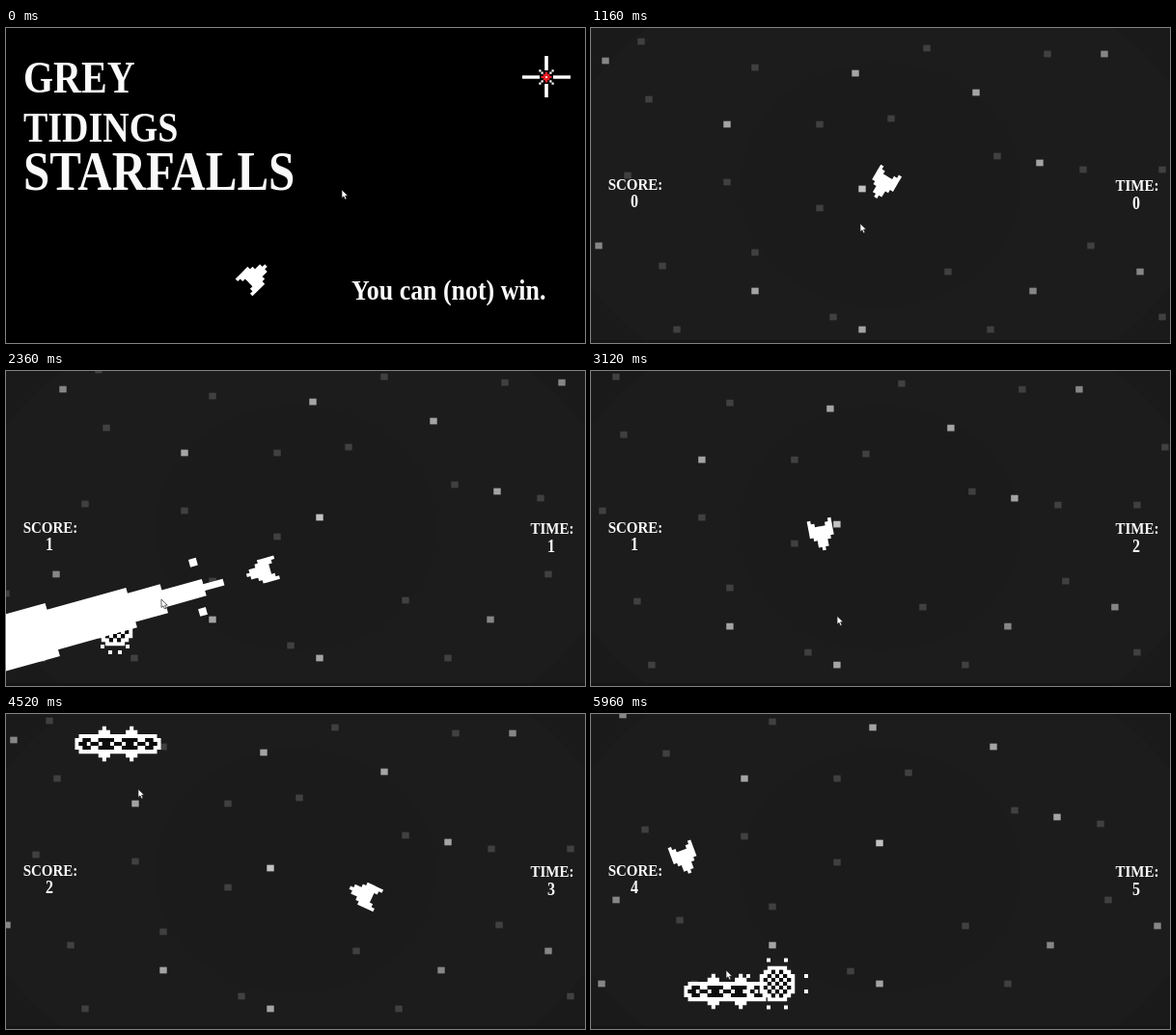
An HTML page that plays this animation: 600x327 px, repeating every 6 s.

```html
<!DOCTYPE html>
<html lang="en">
<head>
<meta charset="utf-8">
<title>Space shooter</title>
<style>
  html, body { margin: 0; width: 100%; height: 100%; overflow: hidden; background: #000; }
  svg { display: block; width: 100vw; height: 100vh; }
  text { font-family: "Liberation Serif", "Times New Roman", serif; font-weight: bold; fill: #fafafa; }
</style>
</head>
<body>
<svg id="stage" viewBox="0 0 600 327" preserveAspectRatio="none"></svg>
<script>
const LOOP = 6000, STEP = 40, START = 720;
const NS = "http://www.w3.org/2000/svg";
const stage = document.getElementById("stage");

function add(parent, tag, attrs = {}) {
  const el = document.createElementNS(NS, tag);
  for (const key in attrs) el.setAttribute(key, attrs[key]);
  parent.appendChild(el);
  return el;
}
const group = parent => add(parent, "g");
const rect = (parent, x, y, width, height, fill = "#fff") =>
  add(parent, "rect", { x, y, width, height, fill });
const square = (parent, x, y, s) => rect(parent, x - s / 2, y - s / 2, s, s);

// Letters are a little taller than the plain face.
function label(parent, x, y, size, text, anchor = "start") {
  const el = add(parent, "text", {
    transform: `translate(${x} ${y}) scale(1 1.15)`, "font-size": size, "text-anchor": anchor
  });
  el.textContent = text;
  return el;
}

// Pixel sprite centred on its own origin.
const COLORS = { "#": "#fff", r: "#e81c24", k: "#0c0c0c" };
function sprite(parent, rows, cell) {
  const g = group(parent);
  const left = -rows[0].length / 2, top = -rows.length / 2;
  for (const ch in COLORS) {
    let d = "";
    rows.forEach((row, y) => [...row].forEach((c, x) => {
      if (c === ch) d += `M${(left + x) * cell} ${(top + y) * cell}h${cell}v${cell}h${-cell}z`;
    }));
    if (d) add(g, "path", { d, fill: COLORS[ch] });
  }
  return g;
}

const mirror = half => half + [...half].reverse().join("");
const SHIP = [
  "#####....", ".#####...", "..######.", "..#######", "..######.", ".#####...", "#####...."
];
const BUG = [
  ".......#...", "......###..", ".##########", "##kk##kkkk#", "#kk#kk#kk#k",
  "##kk##kkkk#", ".##########", "......###..", ".......#..."
].map(mirror);
const WHEEL = [
  "..#r#..", ".#k#k#.", "#kk#kk#", "r#####r", "#kk#kk#", ".#k#k#.", "..#r#.."
];
const SPARK = [
  "#.....#", ".#.r.#.", "..rrr..", ".rr#rr.", "..rrr..", ".#.r.#.", "#.....#"
];
const CHECKER = Array.from({ length: 9 }, (_, y) =>
  Array.from({ length: 9 }, (_, x) => {
    const r = Math.hypot(x - 4, y - 4);
    return r > 4.6 ? "." : r > 3.9 || (x + y) % 2 ? "#" : "k";
  }).join(""));

// Smooth path through [time, x, y] keys.
function at(keys, t) {
  const last = keys.length - 1;
  if (t <= keys[0][0]) return keys[0].slice(1);
  if (t >= keys[last][0]) return keys[last].slice(1);
  let i = 0;
  while (keys[i + 1][0] <= t) i++;
  const a = keys[i], b = keys[i + 1];
  const p = keys[Math.max(i - 1, 0)], n = keys[Math.min(i + 2, last)];
  const h = b[0] - a[0], u = (t - a[0]) / h;
  return [1, 2].map(k => {
    const m0 = (b[k] - p[k]) / (b[0] - p[0]) * h;
    const m1 = (n[k] - a[k]) / (n[0] - a[0]) * h;
    return a[k] * (1 + 2 * u) * (1 - u) ** 2 + m0 * u * (1 - u) ** 2 +
           b[k] * u * u * (3 - 2 * u) + m1 * u * u * (u - 1);
  });
}

const CURSOR = [[0, 348, 168], [680, 322, 186], [1160, 279, 203], [2360, 161, 237],
  [3840, 331, 239], [4520, 137, 78], [5440, 238, 208], [5960, 140, 266]];
const MENU_SHIP = [[0, 258, 258], [680, 256, 262]];
const MENU_SPARK = [[0, 560, 51], [680, 582, 46]];
const PLAYER = [[720, 300, 163], [1160, 303, 162], [2360, 265, 208], [3840, 241, 135],
  [4520, 371, 187], [5440, 158, 115], [5960, 97, 150]];
const CAMERA = [[720, 0, 0], [1160, 0, 0], [2360, 44, -15], [3840, -88, 0],
  [4520, -7, -7], [5440, 88, 8.5], [5960, 18, -33]];
const BUG_PATH = [[3400, 215, -30], [3840, 164, 14], [4520, 116, 31], [5000, 105, 190],
  [5440, 132, 329], [5960, 141, 288]];
const WHEELS = [
  [[1300, -30, 300], [2280, 113, 267]],
  [[4600, -20, 90], [4880, 110, 95]],
  [[5160, 140, 350], [5440, 172, 304], [5880, 193, 280]]
];
const SHOTS = [2100, 3720, 4700, 5560], SHOT_TIME = 360;
const KILLS = [2280, 3760, 4880, 5880];

// Menu screen
const menu = group(stage);
rect(menu, 0, 0, 600, 327, "#000");
label(menu, 18, 67, 40, "GREY");
label(menu, 18, 118, 38, "TIDINGS");
label(menu, 18, 168, 49, "STARFALLS");
label(menu, 358, 282, 25.9, "You can (not) win.");
const spark = group(menu);
rect(spark, -25, -1.7, 18, 3.4);
rect(spark, 7, -1.7, 18, 3.4);
rect(spark, -1.8, -22, 3.6, 15);
rect(spark, -1.8, 7, 3.6, 14);
sprite(spark, SPARK, 2.2);

// Play field
const game = group(stage);
rect(game, 0, 0, 600, 327, "#1b1a1b");
add(game, "ellipse", { cx: 300, cy: 163, rx: 335, ry: 235, fill: "#1d1c1d" });
add(game, "ellipse", { cx: 300, cy: 163, rx: 145, ry: 127, fill: "#1b1b1c" });

const STARS = [
  ["#414041", "52,14 170,41 60,74 141,160 237,100 311,94 348,21 421,133 473,27 510,147 " +
    "592,147 237,187 74,247 170,233 251,300 89,313 370,253 414,313 518,226 592,300 " +
    "38,153 -44,246 621,87"],
  ["#868686", "15,34 532,27 8,226 458,273 569,253 -7,313"],
  ["#a4a4a4", "141,100 399,67 465,140 170,273 281,313 274,47"],
  ["#c2c2c2", "281,167"]
];
const sky = group(game);
for (const [fill, spots] of STARS)
  for (const spot of spots.split(" ")) {
    const [x, y] = spot.split(",").map(Number);
    rect(sky, x - 3.7, y - 3.35, 7.4, 6.7, fill);
  }
rect(game, 0, 324, 600, 3, "#151416");

const bug = sprite(game, BUG, 4.05);
const wheels = WHEELS.map(keys => {
  const live = sprite(game, WHEEL, 4.4);
  const burst = group(game);
  sprite(burst, CHECKER, 4.05);
  const bits = group(burst);
  const spots = keys === WHEELS[0] ? [[5, 25], [13, 19]] : [[9, 24.5], [30, 8]];
  for (const [x, y] of spots)
    for (const sx of [-1, 1]) for (const sy of [-1, 1]) square(bits, x * sx, y * sy, 4);
  return { keys, live, burst, bits, end: keys[keys.length - 1][0] };
});

// Weapon, pointing along +x from the ship
const shot = group(game);
const charge = group(shot);
rect(charge, 69, -4, 700, 8, "#f8f8f8");
const ball = group(charge);
for (const [w, h] of [[28, 10], [24, 20], [14, 27]]) rect(ball, -w, -h, 2 * w, 2 * h, "#f8f8f8");
const beam = group(shot);
for (const [x, w, h] of [[41, 22, 3.5], [62, 44, 9], [105, 36, 15.5], [140, 86, 21.5], [225, 600, 28.5]])
  rect(beam, x, -h, w, 2 * h);
square(beam, 70, -24, 8);
square(beam, 66, 28, 8);

const ship = sprite(stage, SHIP, 3.6);

const hud = group(stage);
label(hud, 46, 167.5, 15, "SCORE:", "middle");
label(hud, 566, 168.5, 15, "TIME:", "middle");
const score = label(hud, 45, 186, 16, "0", "middle");
const clock = label(hud, 565, 187.5, 16, "0", "middle");

const pointer = add(stage, "path", {
  d: "M0 0V8.5L2 6.8L3.4 10L5 9.3L3.6 6.2L6.2 6Z",
  fill: "#fff", stroke: "#222", "stroke-width": 0.7
});

const show = (el, on) => { el.style.display = on ? "" : "none"; };
const place = (el, [x, y], extra = "") =>
  el.setAttribute("transform", `translate(${x} ${y}) ${extra}`);

function drawShot(t, pos, turn) {
  const fired = SHOTS.find(s => t >= s && t < s + SHOT_TIME);
  show(shot, fired !== undefined);
  if (fired === undefined) return;
  const age = t - fired;
  place(shot, pos, turn);
  show(charge, age < 160);
  show(beam, age >= 160);
  place(ball, [69, 0], `scale(${Math.min(1, 0.3 + age / 170)})`);
  beam.setAttribute("transform", `scale(1 ${1 - Math.abs(age - 260) / 200})`);
}

function drawWheel(w, t) {
  const age = t - w.end, pos = at(w.keys, t);
  show(w.live, t >= w.keys[0][0] && age < 0);
  show(w.burst, age >= 0 && age < 240);
  place(w.live, pos);
  place(w.burst, pos);
  w.bits.setAttribute("transform", `translate(0 0)`);
  [...w.bits.children].forEach(bit => {
    const k = age / 80 - 1;
    const x = +bit.getAttribute("x") + 2, y = +bit.getAttribute("y") + 2;
    bit.setAttribute("transform", `translate(${x * k * 0.4} ${y * k * 0.4})`);
  });
}

function draw(t) {
  const playing = t >= START;
  show(menu, !playing);
  show(game, playing);
  show(hud, playing);

  const tip = at(CURSOR, t);
  const pos = at(playing ? PLAYER : MENU_SHIP, t);
  const angle = Math.atan2(tip[1] - pos[1], tip[0] - pos[0]) * 180 / Math.PI;
  const turn = `rotate(${angle})`;
  place(pointer, tip);
  place(ship, pos, turn);
  if (!playing) {
    place(spark, at(MENU_SPARK, t));
    return;
  }
  place(sky, at(CAMERA, t));
  show(bug, t >= BUG_PATH[0][0]);
  place(bug, at(BUG_PATH, t));
  wheels.forEach(w => drawWheel(w, t));
  drawShot(t, pos, turn);
  score.textContent = KILLS.filter(k => t >= k).length;
  clock.textContent = Math.floor((t - START) / 1000);
}

const begin = performance.now();
function tick() {
  const t = (performance.now() - begin) % LOOP;
  draw(Math.floor(t / STEP) * STEP);
  requestAnimationFrame(tick);
}
tick();
</script>
</body>
</html>
```
